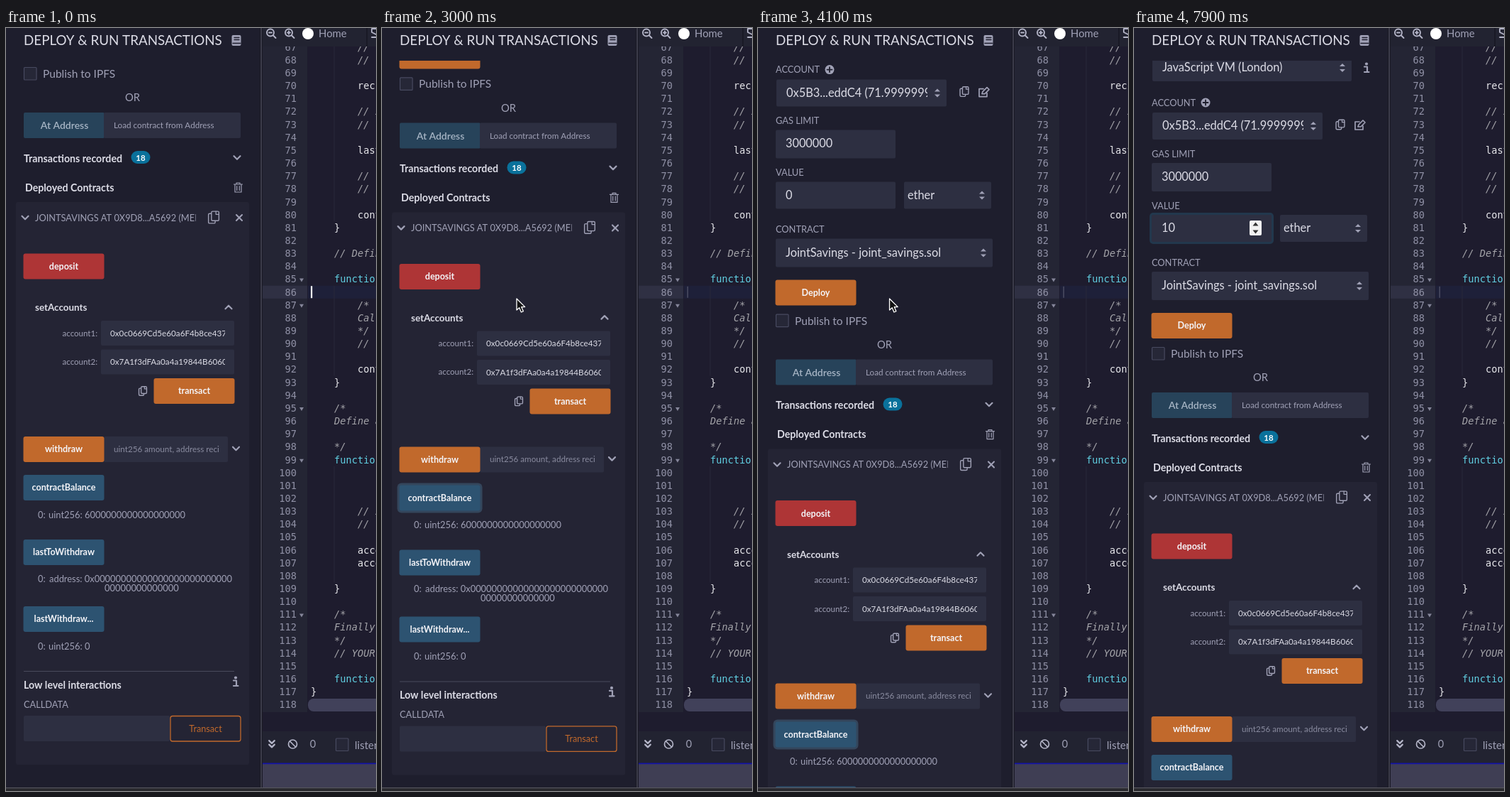
These frames come from a looping animation (522 px wide and 1074 px high, 8000 ms). An HTML page with a canvas:

```html
<!DOCTYPE html>
<html lang="en">
<head>
<meta charset="utf-8">
<title>Deploy and run transactions</title>
<style>
  html, body { margin: 0; height: 100%; overflow: hidden; background: #1e1e2d; }
  canvas { display: block; width: 522px; height: 1074px; }
</style>
</head>
<body>
<canvas id="stage"></canvas>
<script>
const W = 522, H = 1074, LOOP = 8000;
const C = {
  panel: '#1e1e2d', card: '#242434', field: '#2d2f41', editor: '#1e1c2e', gutter: '#242534', bar: '#222331',
  text: '#dcdce6', muted: '#a0a1b6', dim: '#898b9f', orange: '#c1692c', red: '#ae3536', blue: '#2d5371',
  blueDark: '#203a51', address: '#27435a', badge: '#0a719b', ring: '#34465c', line: '#494a5c'
};
const SANS = 'Lato, "Open Sans", sans-serif';
const MONO = '"DejaVu Sans Mono", "Liberation Mono", monospace';

const canvas = document.getElementById('stage');
const ctx = canvas.getContext('2d');
const ratio = window.devicePixelRatio || 1;
canvas.width = W * ratio;
canvas.height = H * ratio;

// ---------- drawing helpers ----------
function rect(x, y, w, h, fill, r = 0, stroke, lw = 1.2) {
  ctx.beginPath();
  ctx.roundRect(x, y, w, h, r);
  if (fill) { ctx.fillStyle = fill; ctx.fill(); }
  if (stroke) { ctx.strokeStyle = stroke; ctx.lineWidth = lw; ctx.stroke(); }
}

// y is the middle of the capital letters
function text(s, x, y, size, color = C.text, { weight = 400, align = 'left', font = SANS, style = '' } = {}) {
  ctx.font = `${style} ${weight} ${size}px ${font}`;
  ctx.textAlign = align;
  ctx.fillStyle = color;
  ctx.fillText(s, x, y + size * 0.355);
}

function path(d, x, y, { fill, stroke, lw = 1.5 }) {
  const p = new Path2D(d);
  ctx.save();
  ctx.translate(x, y);
  ctx.lineJoin = ctx.lineCap = 'round';
  if (fill) { ctx.fillStyle = fill; ctx.fill(p); }
  if (stroke) { ctx.strokeStyle = stroke; ctx.lineWidth = lw; ctx.stroke(p); }
  ctx.restore();
}

function clipped(x, y, w, h, draw) {
  ctx.save();
  ctx.beginPath();
  ctx.rect(x, y, w, h);
  ctx.clip();
  draw();
  ctx.restore();
}

function button(label, y, fill, x = 24.5) {
  rect(x, y - 18, 114, 36, fill, 3);
  text(label, x + 57, y, 12.5, '#f4f4f8', { weight: 700, align: 'center' });
}

function select(label, x, y, w, h, clipWidth = w - 24) {
  rect(x, y - h / 2, w, h, C.field, 2);
  clipped(x, y - h, clipWidth, h * 2, () => text(label, x + (w < 150 ? 5 : 14), y - 0.5, 16.4));
  const ax = x + w - 13;
  path('M-4-2L0-6L4-2ZM-4 2L0 6L4 2Z', ax, y, { fill: C.muted });
}

const label = (s, y) => text(s, 25, y, 12.8, C.muted);
const heading = (s, x, y, size = 14.2) => text(s, x, y, size, C.text, { weight: 700 });
const checkbox = (x, y) => rect(x, y - 8.5, 17.5, 17.5, '#262737', 1, '#484a60');
const chevron = (x, y, dir, color = C.muted, r = 4.5) =>
  path(`M${-r} ${-dir * r / 2}L0 ${dir * r / 2}L${r} ${-dir * r / 2}`, x, y, { stroke: color, lw: 2.2 });

function copyIcon(x, y, k) {
  const color = C.muted;
  rect(x - 7 * k, y - 5 * k, 9 * k, 13 * k, null, 1.5, color, 1.4);
  rect(x - 3 * k, y - 8 * k, 10 * k, 12.5 * k, C.card, 1.5, color, 1.4);
  path(`M${3 * k} ${-8 * k}V${-4 * k}H${7 * k}`, x, y, { stroke: color, lw: 1.2 });
}

function infoIcon(x, y) {
  ctx.beginPath();
  ctx.arc(x, y - 5.5, 2.1, 0, 7);
  ctx.fillStyle = C.muted;
  ctx.fill();
  path('M-3-1.5H1V6M-3 6H3.5', x, y, { stroke: C.muted, lw: 2.2 });
}

function trashIcon(x, y) {
  path('M-6-4.5H6M-2.5-4.5V-6.5H2.5V-4.5M-4.5-4.5V6.5H4.5V-4.5M-1.8-2V4M1.8-2V4', x, y, { stroke: C.muted, lw: 1.2 });
}

// ---------- timeline ----------
const clamp = v => Math.min(1, Math.max(0, v));
const smooth = (t, a, b) => { const p = clamp((t - a) / (b - a)); return p * p * (3 - 2 * p); };

const scrollAt = t => 112 * smooth(t, 2900, 3350) + 282 * smooth(t, 3700, 4240);

const mouseStops = [
  [300, 530, 760], [1400, 88, 657], [2150, 88, 657], [2800, 190, 381],
  [3900, 190, 381], [4200, 184, 381], [4600, 184, 381], [5200, 43, 277]
];
function mouseAt(t) {
  let [, x, y] = mouseStops[0];
  for (let i = 1; i < mouseStops.length; i++) {
    const [a, x0, y0] = mouseStops[i - 1], [b, x1, y1] = mouseStops[i];
    if (t >= a) {
      const p = smooth(t, a, b);
      x = x0 + (x1 - x0) * p;
      y = y0 + (y1 - y0) * p;
    }
  }
  return { x, y };
}

const CLICK_BALANCE = 1900, CLICK_VALUE = 5500, SELECT_VALUE = 5700, TYPE_1 = 6500, TYPE_0 = 6700;

// ---------- side panel ----------
function valueField(t, hover) {
  const focused = t >= CLICK_VALUE;
  if (focused) rect(22, -134, 175, 44, '#22384d', 5);
  rect(25, -131, 169, 38, C.field, 2);
  const selected = t >= SELECT_VALUE && t < TYPE_1;
  if (selected) rect(38, -123, 10, 21, '#2d6ca3');
  const value = t < TYPE_1 ? '0' : t < TYPE_0 ? '1' : '10';
  text(value, 39, -112.5, 16.3);
  if (focused || hover) {
    rect(163, -123, 17, 21, '#f2f2f2', 2);
    path('M-4-3L0-8L4-3ZM-4 3L0 8L4 3Z', 171.5, -112.5, { fill: '#333' });
  }
}

function settings(t, hoverValue) {
  select('JavaScript VM (London)', 26, -338, 281, 38);
  infoIcon(328, -338);
  label('ACCOUNT', -289);
  ctx.beginPath();
  ctx.arc(101, -289, 6.5, 0, 7);
  ctx.fillStyle = C.muted;
  ctx.fill();
  path('M-3.5 0H3.5M0-3.5V3.5', 101, -289, { stroke: C.panel, lw: 1.8 });
  select('0x5B3...eddC4 (71.99999999', 26, -256, 240, 38, 213);
  copyIcon(291, -258, 0.85);
  path('M0-5H-6V6H5V1M-2 2L-1-1L5-7L8-4L2 2Z', 318, -257, { stroke: C.muted, lw: 1.7 });
  label('GAS LIMIT', -217);
  rect(25, -204, 169, 40, C.field, 2);
  text('3000000', 39, -185, 16.3);
  label('VALUE', -144);
  valueField(t, hoverValue);
  select('ether', 206, -112, 123, 38);
  label('CONTRACT', -64);
  select('JointSavings - joint_savings.sol', 25, -31, 306, 40);
  button('Deploy', 25, C.orange);
}

function accountRow(name, value, y) {
  text(name, 129, y, 11.5, C.muted, { align: 'right' });
  rect(134, y - 17.5, 188, 35, C.field, 2);
  clipped(140, y - 18, 169, 36, () => text(value, 147, y, 11.7));
}

function contractCard(t, hoverBalance) {
  rect(14, 245, 329, 792, C.card, 3);
  chevron(27, 267, 1);
  clipped(38, 250, 230, 34, () => text('JOINTSAVINGS AT 0X9D8...A5692 (MEMORY)', 41, 267, 12.8, C.muted));
  copyIcon(293, 266.5, 1.05);
  path('M-4-4L4 4M4-4L-4 4', 329, 267, { stroke: C.muted, lw: 2.1 });

  button('deposit', 335.5, C.red);
  heading('setAccounts', 41, 393.5, 13.4);
  chevron(314, 393, -1);
  accountRow('account1:', '0x0c0669Cd5e60a6F4b8ce437', 429.5);
  accountRow('account2:', '0x7A1f3dFAa0a4a19844B6060', 470);
  copyIcon(193, 511, 0.78);
  button('transact', 511, C.orange, 208.5);

  rect(138, 575, 175, 36, C.field, 2);
  button('withdraw', 593, C.orange);
  text('uint256 amount, address reci', 152, 592.5, 11.7, C.dim);
  chevron(324.5, 592, 1);

  if (t >= CLICK_BALANCE && t < CLICK_VALUE) rect(21.5, 626, 120, 42, C.ring, 6);
  button('contractBalance', 647, hoverBalance ? C.blueDark : C.blue);
  text('0:', 45, 685, 12.8, C.muted);
  text('uint256: 6000000000000000000', 60, 685, 12.9, C.muted);
  button('lastToWithdraw', 738, C.blue);
  text('0:', 45, 775, 12.8, C.muted);
  text('address: 0x' + '0'.repeat(26), 61, 775, 12.9, C.muted);
  text('0'.repeat(14), 139, 788.5, 12.9, C.muted);
  button('lastWithdraw...', 832, C.blue);
  text('0:', 45, 870, 12.8, C.muted);
  text('uint256: 0', 60, 870, 12.9, C.muted);

  rect(25, 905, 297, 1, C.line);
  heading('Low level interactions', 25, 925);
  infoIcon(324, 920);
  label('CALLDATA', 952);
  rect(25, 968, 206, 36, C.field, 2);
  rect(232, 968.5, 99, 35.5, null, 3, C.orange, 1.3);
  text('Transact', 281.5, 986, 12.7, C.orange, { align: 'center' });
}

function sidePanel(t, scroll, hoverBalance, hoverValue) {
  rect(0, 0, 360, H, C.panel);
  text('DEPLOY & RUN TRANSACTIONS', 25, 17.5, 18.8);
  rect(318.5, 10, 13, 15, C.muted, 2);
  path('M0 0H7M0 3H7M-2 8H9', 322, 13.5, { stroke: C.panel, lw: 1.3 });

  clipped(0, 46, 360, 1023, () => {
    ctx.translate(0, scroll);
    settings(t, hoverValue);
    checkbox(25.5, 64);
    text('Publish to IPFS', 52, 64.5, 15.5, C.muted);
    text('OR', 178.5, 98, 14.8, C.muted, { align: 'center' });
    rect(25, 119, 114, 36, C.address, 2);
    rect(138, 119, 193, 36, C.field, 2);
    text('At Address', 82.5, 137.5, 14, '#a6b4c4', { weight: 600, align: 'center' });
    text('Load contract from Address', 152, 137, 11.7, C.muted);
    heading('Transactions recorded', 25, 183.5);
    rect(176.5, 173, 27, 18, C.badge, 9);
    text('18', 190, 182.5, 11.5, '#fff', { weight: 700, align: 'center' });
    chevron(326, 182.5, 1);
    heading('Deployed Contracts', 27, 224.5);
    trashIcon(327.5, 224.5);
    contractCard(t, hoverBalance);
  });
}

// ---------- editor ----------
const ROW = 18.15, CHAR = 8.25;
const rowY = n => 45 + (n - 68) * ROW;
// line number: [column, text]
const code = {
  67: [8, '// '], 68: [8, '// '], 70: [8, 'recipient'], 72: [8, '// I'], 73: [8, '// '], 75: [8, 'lastTo'],
  77: [8, '// '], 78: [8, '// '], 80: [8, 'contract'], 81: [4, '}'], 83: [4, '// Define'], 85: [4, 'function'],
  87: [8, '/*'], 88: [8, 'Call'], 89: [8, '*/'], 90: [8, '// '], 92: [8, 'contract'], 93: [4, '}'],
  95: [4, '/*'], 96: [4, 'Define a'], 98: [4, '*/'], 99: [4, 'function'], 103: [8, '// I'], 104: [8, '// '],
  106: [8, 'account'], 107: [8, 'account'], 109: [4, '}'], 111: [4, '/*'], 112: [4, 'Finally'],
  113: [4, '*/'], 114: [4, '// YOUR'], 116: [4, 'function'], 117: [0, '}']
};
const folds = [85, 87, 95, 99, 111];
const isComment = s => /^(\/|\*|Call|Define|Finally)/.test(s);

function editor(t) {
  rect(360, 0, 162, H, C.editor);
  rect(362, 26, 63, 937, C.gutter);
  rect(362, rowY(86) - 9, 63, 18, '#2f3043');
  rect(426, rowY(86) - 9, 96, 18, '#1e2039');

  clipped(362, 26, 160, 940, () => {
    for (const [a, b] of [[67, 80], [86, 92], [100, 108]])
      rect(462.5, rowY(a) - 9, 1, (b - a + 1) * ROW, '#29283a');
    for (let n = 67; n <= 118; n++) {
      const y = rowY(n);
      text(n, 410, y, 13.7, '#8f90a5', { font: MONO, align: 'right' });
      if (folds.includes(n)) path('M-3-2H3L0 3Z', 417, y + 1, { fill: '#85869a' });
      if (!code[n]) continue;
      const [col, s] = code[n];
      const comment = isComment(s);
      const color = comment ? '#a3a3a8' : s === 'function' ? '#61cfe2' : '#e6e6ea';
      text(s, 430 + col * CHAR, y, 13.7, color, { font: MONO, style: comment ? 'italic' : '' });
    }
  });

  const blurred = t >= CLICK_BALANCE;
  if (blurred) rect(430.5, rowY(86) - 8, 1.5, 16, '#4b4c62');
  else if (t % 1000 < 500) rect(430, rowY(86) - 8.5, 2.2, 17, '#f5f5f5');
  rect(426, 944, 110, 18, '#41415a', 8);
}

function magnifier(x, sign) {
  ctx.beginPath();
  ctx.arc(x - 1, 6.5, 5, 0, 7);
  ctx.strokeStyle = '#b4b5c8';
  ctx.lineWidth = 1.9;
  ctx.stroke();
  path('M3 10.5L6.5 14' + sign, x, 0, { stroke: '#b4b5c8', lw: 1.9 });
}

function toolbars() {
  rect(362, 0, 160, 26, C.bar);
  magnifier(374, 'M-3 6.5H1');
  magnifier(400, 'M-3 6.5H1M-1 4.5V8.5');
  ctx.beginPath();
  ctx.arc(426, 8, 8, 0, 7);
  ctx.fillStyle = '#fff';
  ctx.fill();
  text('Home', 441, 8, 14.9, C.muted);
  rect(508.5, 0, 1.5, 26, '#171722');
  path('M7 1H1V6L7 9M1 13H7', 515, 0, { stroke: '#b4b5c8', lw: 1.8 });

  rect(362, 990, 160, 45, C.bar);
  chevron(375, 1005, 1, '#b4b5c8', 3.8);
  chevron(375, 1010.5, 1, '#b4b5c8', 3.8);
  ctx.beginPath();
  ctx.arc(404.5, 1008, 6, 0, 7);
  ctx.strokeStyle = '#b4b5c8';
  ctx.lineWidth = 1.7;
  ctx.stroke();
  path('M-4-4L4 4', 404.5, 1008, { stroke: '#b4b5c8', lw: 1.7 });
  text('0', 433, 1008, 14.5, C.muted, { align: 'center' });
  checkbox(465.5, 1008.5);
  text('listen', 492, 1010, 15, C.muted);

  rect(362, 1036, 160, 33, '#3f3e54');
  rect(362, 1034.5, 160, 1.8, '#1515a8');
  rect(358, 0, 4, 1069, '#191924');
  rect(359.3, 0, 1.5, 1069, '#484858');
  rect(0, 1069, W, 1.5, '#55555c');
  rect(0, 1070.5, W, 3.5, '#28282c');
}

// ---------- mouse pointer ----------
const pointers = {
  arrow: ['M0 0V16L3.7 12.7L6.4 19L9.4 17.7L6.7 11.6H11.7Z', '#111', '#fff'],
  hand: ['M-2 0Q0-2 1.5 0L3 6Q5 4.5 6 6.5Q8 5.5 8.5 7.5Q10.5 7 10.8 9L11 13L9 19H1L-5 11Q-5 8 -2 9.5L0 11Z', '#fff', '#111']
};

function pointer(kind, x, y) {
  if (kind === 'beam') {
    const beam = 'M-4-9Q0-9 0-6Q0-9 4-9M0-6V6M-4 9Q0 9 0 6Q0 9 4 9M-2 2H2';
    path(beam, x, y, { stroke: '#f4f4f4', lw: 3.6 });
    path(beam, x, y, { stroke: '#222', lw: 1.3 });
    return;
  }
  const [shape, fill, stroke] = pointers[kind];
  path(shape, x, y, { fill, stroke, lw: 1.3 });
}

function draw(t) {
  ctx.setTransform(ratio, 0, 0, ratio, 0, 0);
  const scroll = scrollAt(t);
  const { x, y } = mouseAt(t);
  const mouseVisible = t >= 300 && t < TYPE_1;
  const over = (x0, y0, x1, y1) => mouseVisible && x >= x0 && x <= x1 && y - scroll >= y0 && y - scroll <= y1;
  const hoverBalance = over(25, 629, 138, 665);
  const hoverValue = over(25, -131, 194, -93);
  const hoverText = over(25, 173, 204, 192);

  editor(t);
  sidePanel(t, scroll, hoverBalance, hoverValue);
  toolbars();
  if (mouseVisible) pointer(hoverBalance ? 'hand' : hoverValue || hoverText ? 'beam' : 'arrow', x, y);
}

const start = performance.now();
function tick() {
  draw((performance.now() - start) % LOOP);
  requestAnimationFrame(tick);
}
tick();
</script>
</body>
</html>
```
